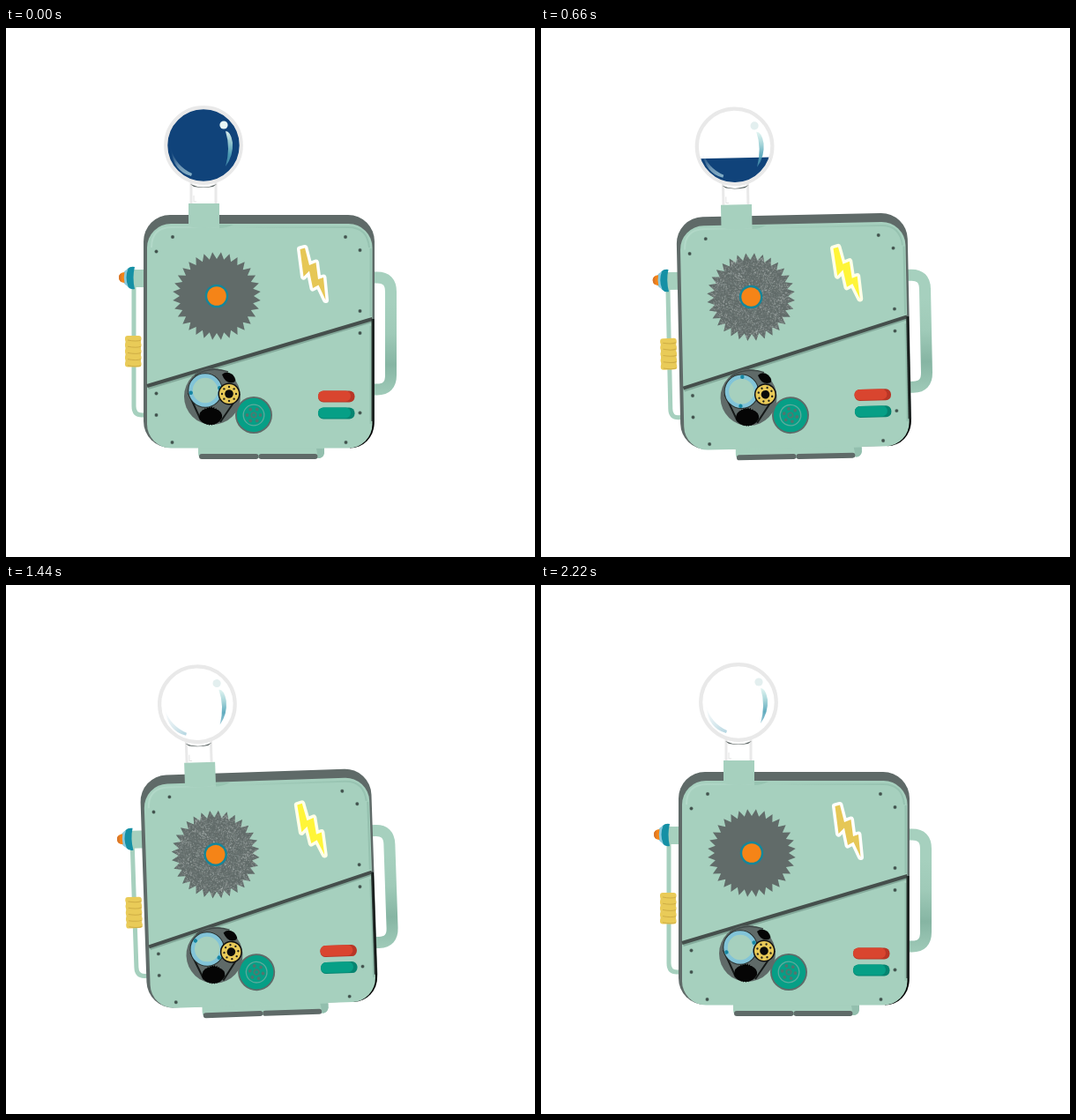
An HTML page with a canvas that plays this animation: 600x600 px, repeating every 2280 ms.

```html
<!DOCTYPE html>
<html lang="en">
<head>
<meta charset="utf-8">
<title>Shaking machine</title>
<style>
html, body { margin: 0; width: 100%; height: 100%; overflow: hidden; background: #fff; }
canvas { display: block; width: 600px; height: 600px; }
</style>
</head>
<body>
<canvas id="stage" width="600" height="600"></canvas>
<script>
const ctx = document.getElementById('stage').getContext('2d');
const LOOP = 2280, STEP = 60, TAU = Math.PI * 2;
const MINT = '#a6d0be', GREY = '#5f6a68', TEAL = '#1590a5', ORANGE = '#f58417',
  YELLOW = '#e6c85a', GREEN = '#069f86', NAVY = '#10437a', GLASS = '#e9e9e9';

const clamp = v => Math.max(0, Math.min(1, v));
const ease = v => (1 - Math.cos(Math.PI * clamp(v))) / 2;
const ramp = (t, a, b) => ease((t - a) / (b - a));

function keyed(t, keys) {
  for (let i = 1; i < keys.length; i++) {
    const [t0, v0] = keys[i - 1], [t1, v1] = keys[i];
    if (t <= t1) return v0 + (v1 - v0) * ramp(t, t0, t1);
  }
  return keys[keys.length - 1][1];
}

const TILT = [[0, 0], [520, -2], [1000, 2.1], [1480, -2], [1800, 0.5], [2130, 0]];

// Share of the liquid gone: slow start, fast middle, long tail
const drained = t => t > 0 ? 1 / (1 + (559 / t) ** 3.45) : 0;

function paint(fill, stroke, width = 1) {
  if (fill) { ctx.fillStyle = fill; ctx.fill(); }
  if (stroke) { ctx.strokeStyle = stroke; ctx.lineWidth = width; ctx.stroke(); }
}
function disc(x, y, r, fill, stroke, width) {
  ctx.beginPath();
  ctx.arc(x, y, r, 0, TAU);
  paint(fill, stroke, width);
}
function box(x, y, w, h, r, fill) {
  ctx.beginPath();
  ctx.roundRect(x, y, w, h, r);
  paint(fill);
}
function shape(d, fill, stroke, width) {
  const p = new Path2D(d);
  if (fill) { ctx.fillStyle = fill; ctx.fill(p); }
  if (stroke) { ctx.strokeStyle = stroke; ctx.lineWidth = width; ctx.stroke(p); }
}
function fade(x0, y0, x1, y1, ...colors) {
  const g = ctx.createLinearGradient(x0, y0, x1, y1);
  colors.forEach((c, i) => g.addColorStop(i / (colors.length - 1), c));
  return g;
}
function spin(x, y, angle, draw) {
  ctx.save();
  ctx.translate(x, y);
  ctx.rotate(angle);
  draw();
  ctx.restore();
}
function ringDots(n, radius, r, color) {
  for (let i = 0; i < n; i++) {
    const a = i / n * TAU;
    disc(Math.cos(a) * radius, Math.sin(a) * radius, r, color);
  }
}
function cogPath(n, outer, inner) {
  ctx.beginPath();
  for (let i = 0; i < n * 2; i++) {
    const a = (i + 1) / n * Math.PI - Math.PI / 2, r = i % 2 ? inner : outer;
    ctx.lineTo(Math.cos(a) * r, Math.sin(a) * r);
  }
  ctx.closePath();
}

// Seeded grain for the saw blade
let seed = 7;
const rnd = () => (seed = seed * 16807 % 2147483647) / 2147483647;
const grain = Array.from({ length: 4000 }, () => {
  const r = 47 * Math.sqrt(rnd()), a = rnd() * TAU;
  const x = r * Math.cos(a), y = r * Math.sin(a);
  const patch = 0.6 + 0.25 * Math.sin(x / 5 + Math.sin(y / 6) * 2) * Math.cos(y / 7);
  return { x, y, order: (y - x + 66) / 132, alpha: patch * (0.1 + 0.5 * rnd()) };
});

function pipes() {
  ctx.lineCap = 'butt';
  shape('M145 290V429Q145 439 154 439H164', null, MINT, 5);
  shape('M410 283H421Q436.500 283 436.500 299V394Q436.500 410 421 410H410', null,
    fade(0, 276, 0, 417, MINT, MINT, '#9fcab8', '#86b5a3', '#a0cbb9'), 13);

  box(135.5, 350, 17.5, 34, 3, YELLOW);
  for (let y = 349; y < 380; y += 7.2) {
    box(135, y, 18.5, 6.7, 3, '#e9cb58');
    shape(`M138 ${y + 5}Q148 ${y + 7} 153 ${y + 5}`, null, '#cfae45', 1);
  }

  box(144, 274, 20, 20, 2, MINT);
  shape('M146 271Q141 270 138 273Q131 283 138 293Q141 297 146 296Q143 283 146 271Z', TEAL);
  shape('M138.500 273Q134 275 132.500 279V287Q134 291 138.500 293Q134.500 283 138.500 273Z', '#8bc9dc');
  shape('M134.500 277Q128 277.500 128 283Q128 288.500 134.500 289Q133 283 134.500 277Z', ORANGE);
  shape('M131 278.500Q127.500 280 128 283Q128 286.500 131 288Q130 283 131 278.500Z', '#d9772a');
}

function body() {
  box(156, 212, 262, 264, 30, GREY);
  box(390, 330, 27.5, 146.5, [0, 0, 28, 0], '#000');
  shape('M218 472H361V482Q360 488 353 488H223Q218 488 218 482Z', MINT);
  shape('M352 477H361V482Q360 488 354 488Z', '#93bfae');
  box(219, 483, 67.5, 6, 3, GREY);
  box(286.5, 483, 67, 6, 3, GREY);

  box(160, 222, 255.5, 254.5, 27, MINT);
  shape('M165 249Q165 226 188 226H388Q410 226 412 249', null, fade(160, 0, 415, 0, '#b3d9c9', '#a2ccba', '#96c2b0'), 2);
  shape('M413.500 250V327M413.500 338V449', null, '#95c1af', 2);
  shape('M161 407.500L415 331.500', null, '#84aa9b', 5);
  shape('M160 406L415.500 330', null, '#454f4c', 4);
  shape('M415.500 330V446', null, '#26302d', 2);

  const rivets = [[189, 237], [170.5, 253.5], [385, 237], [401.5, 252], [401.5, 321],
    [401.5, 346], [170.5, 414.5], [170.5, 439], [188.5, 470], [385.5, 470], [401.5, 436.5]];
  for (const [x, y] of rivets) {
    disc(x, y, 2.2, '#7d9f92');
    disc(x, y, 1.7, '#42524d');
  }

  box(354, 411.5, 41.5, 13, 6, '#b83626');
  box(354, 411.5, 37, 12, 6, '#d9452f');
  box(354, 430.5, 41.5, 13, 6, '#058470');
  box(354, 430.5, 37, 12, 6, GREEN);
}

function flask(t) {
  const cx = 224, cy = 133;
  shape('M210 175V199M238 175V199', null, GLASS, 3);
  shape('M213 190V197H216', null, '#e3e3e3', 1);
  shape('M209 177Q224 184 239 177L235 180Q224 182 213 180Z', '#5d6665');
  shape('M207 199H242V225Q224 229 207 225Z', MINT);
  shape('M242 223H258Q250 227 242 227Z', '#98c5b2');

  disc(cx, cy, 43, '#fff');
  const level = cy - 42 + 86 * drained(t);
  if (level < cy + 40.6) {
    ctx.save();
    ctx.beginPath();
    ctx.arc(cx, cy, 41.5, 0, TAU);
    ctx.clip();
    ctx.fillStyle = NAVY;
    ctx.fillRect(cx - 45, level, 90, 90);
    ctx.restore();
  }
  disc(cx, cy, 42.8, null, GLASS, 4.2);
  disc(247, 110, 4.6, level < 106 ? '#e9f7f6' : '#e3efef');
  shape('M249 117Q262 117 249 157Q255 136 249 117Z', null);
  shape('M249 117Q255 117 257 130Q258 145 249 157Q255 136 249 117Z', fade(0, 117, 0, 157,
    'rgba(226,245,242,.95)', 'rgba(160,210,214,.9)', 'rgba(80,163,184,.9)', 'rgba(90,165,190,.6)'));
  shape('M187 137Q193 157 211 165L210 168Q190 163 187 137Z', fade(188, 142, 211, 167,
    'rgba(180,210,220,.05)', 'rgba(190,218,226,.55)', 'rgba(160,203,217,.8)'));
}

function saw(t) {
  const show = ramp(t, 30, 480) * (1 - ramp(t, 1440, 2070));
  spin(239, 304, 0, () => {
    cogPath(32, 50, 42);
    paint('#616b69');
    if (show > 0.01) {
      for (const g of grain) {
        const a = g.alpha * clamp(show * 2 - g.order * 1.1);
        if (a < 0.02) continue;
        ctx.fillStyle = `rgba(190,197,195,${a})`;
        ctx.fillRect(g.x, g.y, 1.1, 1.1);
      }
    }
    disc(0, 0, 13.3, '#16869a');
    disc(0, 0, 10.8, ORANGE);
  });
}

function bolt(t) {
  const glow = ramp(t, 0, 300) * (1 - ramp(t, 1800, 2130));
  const mix = (a, b) => Math.round(a + (b - a) * glow);
  const d = 'M333.500 251L339 249.500L344 269L351.500 266L354 285L360 283L362.500 308.500L354.500 291.500L348 295L344 275.500L337.500 282Z';
  ctx.lineJoin = 'round';
  shape(d, null, `rgb(255,255,${mix(252, 232)})`, 7);
  shape(d, `rgb(${mix(230, 255)},${mix(199, 245)},${mix(86, 56)})`);
}

function gears(t) {
  const turn = t / LOOP * TAU;
  disc(234, 418, 32, GREY);
  shape('M207 414L221 445M265 415L243 447', null, '#151918', 2);
  shape('M214 394Q232 383 252 390', null, '#414b49', 1.5);
  shape('M245 393Q250 388 257 393Q263 400 258 402Q249 404 245 393Z', '#050505');

  spin(232, 440, turn, () => {
    cogPath(24, 11, 9);
    paint('#000');
  });
  shape('M219 442Q219 434 226 432H238Q246 435 245 442Q241 450 232 450Q222 450 219 442Z', '#050505');

  disc(226, 411, 19.8, '#27302f');
  disc(226, 411, 16.5, MINT, '#82c4d8', 4.5);
  spin(226, 411, turn - 0.17, () => {
    disc(-16.5, 0, 2.2, '#1686a2');
    disc(16.5, 0, 2.2, '#1686a2');
  });

  disc(253, 415, 12.5, '#111');
  disc(253, 415, 11, '#e9ca58');
  spin(253, 415, -turn * 2, () => {
    disc(0, 0, 4.8, '#0a0a0a');
    ringDots(8, 8, 1.2, '#27261c');
  });

  disc(281, 439, 21, GREY);
  disc(281, 439, 19.2, GREEN);
  spin(281, 439, -turn, () => {
    disc(0, 0, 11.8, null, '#5cab9d', 1.3);
    ringDots(6, 7.5, 1.9, '#51756e');
    disc(0, 0, 3.6, '#4d7970');
    disc(0, 0, 1.8, GREEN);
  });
}

function draw(t) {
  ctx.setTransform(1, 0, 0, 1, 0, 0);
  ctx.fillStyle = '#fff';
  ctx.fillRect(0, 0, 600, 600);
  ctx.translate(288, 345);
  ctx.rotate(keyed(t, TILT) * Math.PI / 180);
  ctx.translate(-288, -345);
  pipes();
  body();
  flask(t);
  saw(t);
  bolt(t);
  gears(t);
}

const start = performance.now();
function tick(now) {
  const t = Math.max(0, now - start) % LOOP;
  draw(Math.floor(t / STEP) * STEP);
  requestAnimationFrame(tick);
}
draw(0);
requestAnimationFrame(tick);
</script>
</body>
</html>
```
